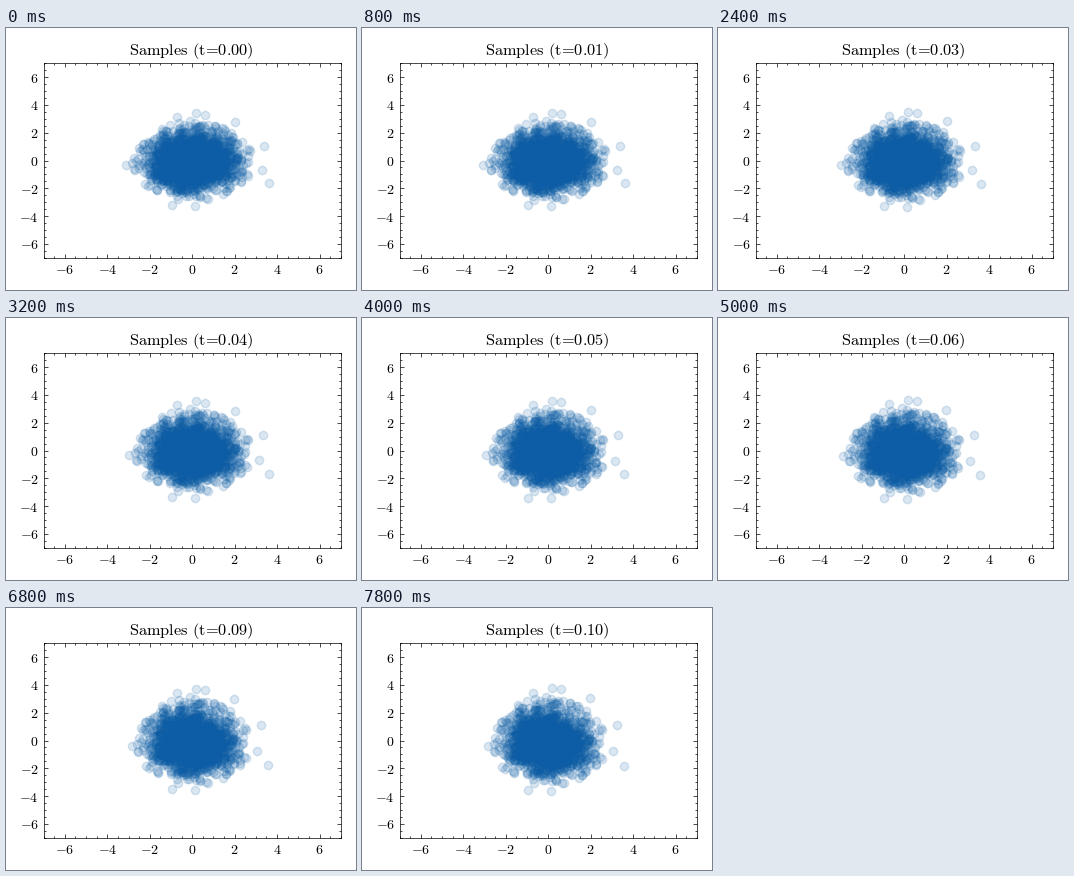
A matplotlib script for the animation above (8 s loop, 350 px wide and 262 px high).

```python
import numpy as np
import matplotlib.pyplot as plt
from matplotlib.animation import FuncAnimation
from matplotlib.ticker import MultipleLocator

W, H, DPI = 350, 262, 100
LEFT, RIGHT, TOP, BOTTOM = 37.6, 334.8, 35.3, 229.7
LIM = 7
FRAMES, INTERVAL = 40, 200
STEPS = 399
COUNT = 2200
RADIUS = 2.9
BLUE = "#0C5DA5"

plt.rcParams.update({
    "mathtext.fontset": "cm",
    "axes.linewidth": 0.5,
    "font.size": 10,
})

# The few samples that stand clear of the cloud.
STRAGGLERS = [(3.63, -1.6), (3.4, 1.05), (3.28, -0.65), (-3.1, -0.3),
              (0.2, 3.4), (0.6, 3.3), (-0.7, 3.1), (2.0, 2.75),
              (0.15, -3.25), (-0.95, -3.2)]


def make_cloud():
    rng = np.random.default_rng(7)
    core = rng.normal(size=(COUNT * 2, 2))
    core = core[np.hypot(*core.T) < RADIUS][:COUNT]
    return np.vstack([core, STRAGGLERS])


def bump(p, cx, cy, width):
    return np.exp(-((p[:, 0] - cx) ** 2 + (p[:, 1] - cy) ** 2) / width)


def drift(p):
    """Displacement of each point over the whole clip."""
    x, y = p.T
    upper = bump(p, 1.1, 1.3, 0.9)
    lower = bump(p, -1.0, -1.4, 0.8)
    dx = -0.09 * x * np.exp(-y ** 2 / 1.5) - 0.22 * upper + 0.1 * lower
    dy = (0.115 * y - 0.08 * np.exp(-y ** 2 / 2) - 0.28 * upper
          + 0.22 * lower - 0.12 * bump(p, 1.0, -1.4, 0.8))
    return np.column_stack([dx, dy])


def title_text(t):
    return (r"$\mathrm{Samples\hspace{0.38}(t\hspace{-0.2}=\hspace{-0.2}"
            + f"{t:.2f}" + r")}$")


start = make_cloud()
shift = drift(start)

fig = plt.figure(figsize=(W / DPI, H / DPI), dpi=DPI, facecolor="white")
ax = fig.add_axes([LEFT / W, 1 - BOTTOM / H,
                   (RIGHT - LEFT) / W, (BOTTOM - TOP) / H])
ax.set(xlim=(-LIM, LIM), ylim=(-LIM, LIM))
for axis in (ax.xaxis, ax.yaxis):
    axis.set_major_locator(MultipleLocator(2))
    axis.set_minor_locator(MultipleLocator(0.5))
    axis.set_major_formatter(lambda v, _: f"${v:.0f}$")
ax.tick_params(which="both", direction="in", top=True, right=True, width=0.5)
ax.tick_params(which="major", length=3)
ax.tick_params(which="minor", length=1.5)

dots = ax.scatter(*start.T, s=36, color=BLUE, alpha=0.15, linewidths=1)
title = ax.set_title(title_text(0), fontsize=11.75, x=0.498)


def update(k):
    u = k / (FRAMES - 1)
    pace = np.array([1 - (1 - u) ** 1.4, u])
    dots.set_offsets(start + shift * pace)
    title.set_text(title_text(k / STEPS))
    return dots, title


anim = FuncAnimation(fig, update, frames=FRAMES, interval=INTERVAL,
                     repeat=True, repeat_delay=0)
plt.show()
```
